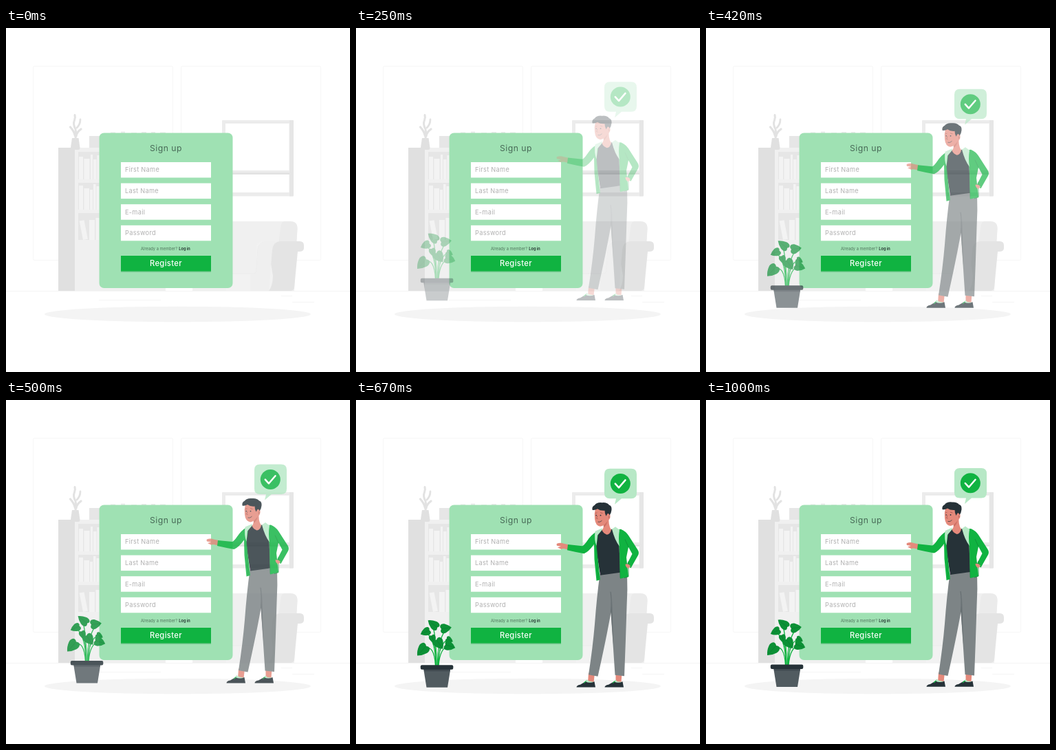
An HTML page that plays this animation: 500x500 px, repeating every 1.04 s.

```html
<!DOCTYPE html>
<html lang="en">
<head>
<meta charset="utf-8">
<title>Sign up</title>
<style>
  html, body { margin: 0; width: 100%; height: 100%; overflow: hidden; background: #fff; }
  svg { display: block; width: 100vw; height: 100vh; }
  text { font-family: Inter, "Open Sans", sans-serif; }
  .hint { font-size: 9.2px; letter-spacing: .3px; fill: #b0b0b0; }
</style>
</head>
<body>
<svg viewBox="0 0 500 500" xmlns="http://www.w3.org/2000/svg">
  <g id="room">
    <g fill="#fff" stroke="#f6f6f6">
      <rect x="39.5" y="55.5" width="203" height="282" rx="2"/>
      <rect x="254.5" y="55.5" width="203" height="282" rx="2"/>
    </g>
    <path d="M0 382.5H500" stroke="#efefef" stroke-width=".7"/>
    <path d="M135 395.5H225M416 398.5H448M400 389.5H416" stroke="#f1f1f1" stroke-width=".7"/>

    <!-- window -->
    <rect x="314" y="134" width="104" height="110.5" rx="1" fill="#ececec"/>
    <path d="M412 134H417Q418 134 418 135V243.5Q418 244.5 417 244.5H412Z" fill="#e6e6e6"/>
    <path d="M319 138H411.5V207H319ZM319 213H411.5V239H319Z" fill="#fff"/>
    <path d="M319 138H411.5" stroke="#e2e2e2"/>
    <path d="M317 211.5H412" stroke="#e0e0e0" stroke-width="2"/>

    <!-- shelf -->
    <path d="M100 174H232V382H100Z" fill="#f0f0f0"/>
    <path d="M76 174H100V382H76Z" fill="#e0e0e0"/>
    <path d="M105 180H232V220H105ZM105 225H232V264H105ZM105 269H232V308H105Z" fill="#e6e6e6"/>
    <g id="books" fill="#f3f3f3"></g>
    <path d="M121 157H150V174H121Z" fill="#e6e6e6"/>
    <path d="M152 151.5H159V156H152ZM167 150.5H173V156H167ZM182 152H190V156H182ZM197 151H204V156H197ZM211 151H217V156H211ZM224 151.5H232V156H224Z" fill="#ebebeb"/>
    <path d="M96 160H105.5L107.5 174Q107.5 177 105 177H96Q94 177 94 174Z" fill="#e0e0e0"/>
    <g fill="none" stroke="#e2e2e2" stroke-linecap="round">
      <path d="M101 161Q102 152 101 147Q97 140 99.500 134Q101 130 100 126.500" stroke-width="3"/>
      <path d="M100.500 157Q99 150 93.500 144M102 157Q103 151 109 147" stroke-width="3.200"/>
      <path d="M103 145Q108 140 108 133" stroke-width="2.800"/>
    </g>

    <!-- sofa -->
    <path d="M271 382V357H320V281H412Q424 281 423.500 292L419 382Z" fill="#f0f0f0"/>
    <path d="M404 281H413Q424 281 423.500 292L422 314H396L399 290Q399.500 282 404 281Z" fill="#ebebeb"/>
    <path d="M320 357H364V316Q366 310 376 310H395L385 382H320Z" fill="#f2f2f2"/>
    <path d="M329 357H362Q364 355 364 351L366 322Q367 311 378 311" fill="none" stroke="#e9e9e9" stroke-width=".8"/>
    <path d="M392 310H427Q433 310 433 316V320Q433 325 426 325H424L419 377Q418.500 382 413 382H382Q388 374 388 360L382 325Q383 310 392 310Z" fill="#e4e4e4"/>
    <path d="M378 310H398Q388 311 387 323L384 357Q383 370 382 382H355V357H362Q364 355 364 351L366 323Q367 310 378 310Z" fill="#efefef"/>
    <ellipse cx="249.500" cy="416" rx="193.500" ry="11.300" fill="#f4f4f4"/>
  </g>

  <g id="form">
    <rect x="135.500" y="152.500" width="194" height="225.500" rx="7" fill="#9fe1b3"/>
    <text x="209" y="178.500" font-size="12.200" letter-spacing=".5" fill="#486a57">Sign up</text>
    <g id="fields"></g>
    <text x="196" y="322.800" font-size="5.600" letter-spacing=".12" fill="#4d7059">Already a member?</text>
    <text x="251.300" y="322.800" font-size="5.600" font-weight="700" fill="#2b4038">Log in</text>
    <rect x="167" y="332" width="131" height="23" fill="#78c992"/>
    <rect x="167" y="331" width="131" height="22.500" fill="#10b341"/>
    <text x="209" y="345.600" font-size="11.200" letter-spacing=".35" font-weight="500" fill="#fff">Register</text>
  </g>

  <g class="drop" id="bubble">
    <path d="M369 99H400Q408 99 408 107V134.500Q408 142.500 400 142.500H386L376 151L378 142.500H369Q361 142.500 361 134.500V107Q361 99 369 99Z" fill="#b7e8c6"/>
    <circle cx="384.300" cy="120.800" r="14.500" fill="#10b341"/>
    <path d="M376.800 121L382 126.700L391.500 115.700" fill="none" stroke="#fff" stroke-width="2.500" stroke-linecap="round" stroke-linejoin="round"/>
  </g>

  <g class="drop" id="man">
    <!-- legs -->
    <g fill="#e4897b">
      <path d="M338 396H347L345.500 410H337Z"/>
      <path d="M377.500 396H386.500L385.500 410H377.500Z"/>
    </g>
    <g fill="#b7e8c6">
      <path d="M332 409L335 405.500L339 408L345 409V411H333Z"/>
      <path d="M374 409L377 406L380 408.500L386 409V411H375Z"/>
    </g>
    <g fill="#263238">
      <path d="M320.500 416.800Q320.500 414 326 413L333.500 408.500Q340 411.500 346.500 408.500L348 416.800Z"/>
      <path d="M361.500 416.800Q361.500 414 367 413L375 408.500Q381 411.500 387.500 408.500L389 416.800Z"/>
    </g>
    <path d="M331 411L334.500 408M373 411L376.500 408" stroke="#10b341" stroke-width="1.200"/>
    <path d="M354.500 252L394 249Q395 275 393.500 300Q392 350 390 400.500L376.500 399L370.500 308Q364 345 351.500 401L338 398.500Q344 360 347 325Q350 285 354.500 252Z" fill="#7d8486"/>
    <path d="M370.500 308Q372 290 370 278" fill="none" stroke="#5f686b" stroke-width=".9"/>
    <path d="M370.500 308L372 288L374.500 362Z" fill="#697174"/>

    <!-- torso -->
    <path d="M357 188L374 187L382 196L384 250L355 254L349 216L349.500 196Z" fill="#263238"/>
    <path d="M358 172L368 168Q366 180 371 188Q369 195 364.500 195Q359.500 193 357.500 188.500Q361 184 359.500 179Z" fill="#e4897b"/>
    <path d="M359.500 178.500Q364 179 366 174Q364 183 360 184Z" fill="#ce7266"/>

    <!-- jacket and arms -->
    <path d="M292 208Q297 206 302 208L309 209.500L308 217Q302 214.500 298 216L293 213.500L298 212L292 211Q291 209 292 208Z" fill="#e4897b"/>
    <path d="M308 209.300L329 211.500Q332 210 336 204Q342 195 349 191L352 194L349.500 212L351.500 230L355 260.500L349.500 262L346.500 231L346 209Q338 220 331.500 222.500Q320 220.500 307 217.500Z" fill="#10b341"/>
    <path d="M377 188L385 187Q392 190 396 196L409.500 217Q412 221 410 225L399.500 243.500L393 239.500L401.500 223L396 213L393 228L396 256L384 259L383 215Z" fill="#10b341"/>
    <path d="M396 213L391 202M396 234L396 256L390 258" fill="none" stroke="#0c8e35" stroke-width=".8"/>
    <path d="M391.500 238Q396 236.500 399 241L396 244Q392 243 391.500 238Z" fill="#e4897b"/>
    <path d="M347.500 190L358 185.500L357 189L351 196L349.500 211Q346 203 347.500 190Z" fill="#b7e8c6"/>
    <path d="M372 187L377 183.500L383 188Q381 200 383 212Q376 203 372 187Z" fill="#b7e8c6"/>
    <path d="M383 212L384 258M349.500 211L352 260" stroke="#0c8e35" stroke-width=".6"/>

    <!-- head -->
    <path d="M348 157Q346 164 347 172Q348 182 355 183Q361 182.500 365 175Q370 173 369.500 167L366 155L356 153Z" fill="#e4897b"/>
    <path d="M343.500 159Q342.500 154 347 152Q350 147.500 358 148.500Q365 148 368 152Q372 153 371.500 159Q371 164 368.500 167Q368 163.500 365.500 164.500L363.500 168Q361.500 164 361.500 160Q355 160.500 351 157.500Q347 160 343.500 159Z" fill="#263238"/>
    <path d="M367 168Q369 168.500 367.500 171M348.200 164L350.500 163.200M355 163L358.500 164M351 167.500L349.500 171.500L351.500 172" fill="none" stroke="#9b4f48" stroke-width=".7"/>
    <path d="M351.500 176.500Q355 177.500 357.500 174.500" fill="none" stroke="#263238" stroke-width=".7"/>
    <g fill="#263238"><circle cx="349.200" cy="167" r=".8"/><circle cx="355.500" cy="167" r=".9"/></g>
  </g>

  <g class="drop" id="plant">
    <g fill="none" stroke="#10b341" stroke-width="1.300">
      <path d="M117 386Q117 352 112 327M116 386Q116 350 103 338M118.500 386Q118 350 130 334"/>
      <path d="M115.500 386Q114 354 99 361M119 386Q121 366 123 357M120 386Q122 358 136 357M119 386Q120 352 135 347M116.500 386Q117 360 112 347"/>
    </g>
    <g id="leaves"></g>
    <path d="M98 389H137.500L133 417H102.500Z" fill="#515b60"/>
    <path d="M98.500 390H137L136.500 393.500H99Z" fill="#414b51"/>
    <rect x="93.800" y="384.500" width="47.500" height="6.500" rx="2" fill="#263238"/>
  </g>
</svg>
<script>
const LOOP = 1040, STEP = 1000 / 24, DROP = 30;
const $ = id => document.getElementById(id);

$("fields").innerHTML = ["First Name", "Last Name", "E-mail", "Password"].map((label, i) => {
  const y = 195 + i * 30.6;
  return `<rect x="167" y="${y}" width="131" height="22.500" fill="#fff"/>` +
    `<text class="hint" x="173" y="${y + 14.3}">${label}</text>`;
}).join("");

const book = (x, base, w, h, tilt = 0) =>
  `<rect x="${x}" y="${base - h}" width="${w}" height="${h}" transform="rotate(${tilt} ${x} ${base})"/>`;
$("books").innerHTML = [
  book(106, 220, 6, 33), book(113.500, 220, 8, 30), book(123, 220, 3, 36), book(127, 220, 4.500, 29), book(132.500, 220, 4, 35),
  book(106, 264, 6, 35), book(113.500, 264, 7.500, 31), book(122, 264, 4, 29), book(127, 264, 3.500, 37), book(131.500, 264, 5, 34),
  book(112, 308, 7, 28, -11), book(121, 308, 8, 29), book(130.500, 308, 6, 32)
].join("");

// Heart-shaped leaf: rounded base at (x, y), tip along the angle.
function leaf(x, y, len, wide, angle) {
  const h = wide / 2;
  return `<g transform="translate(${x} ${y}) rotate(${angle})">` +
    `<path d="M0 0C${-len * .25} ${-h * .8} ${len * .1} ${-h * 1.3} ${len * .4} ${-h}Q${len * .75} ${-h * .7} ${len} 0` +
    `Q${len * .75} ${h * .7} ${len * .4} ${h}C${len * .1} ${h * 1.3} ${-len * .25} ${h * .8} 0 0Z" fill="#0c9036"/>` +
    `<path d="M0 0H${len * .85}" stroke="#0a7a2e" stroke-width=".6"/></g>`;
}
$("leaves").innerHTML = [
  leaf(118, 330, 17, 12, 218), leaf(106.500, 334, 14, 11, 155), leaf(124, 332, 15, 13, -8),
  leaf(102, 357, 19, 15, 133), leaf(132, 346, 10, 8, 28), leaf(110, 342, 12, 9, 72),
  leaf(117, 348, 16, 14, 55), leaf(130, 355, 15, 13, 18)
].join("");

const cubic = (u, a, b) => 3 * u * (1 - u) * ((1 - u) * a + u * b) + u ** 3;

function ease(x) {
  let lo = 0, hi = 1;
  for (let i = 0; i < 30; i++) {
    const mid = (lo + hi) / 2;
    if (cubic(mid, .36, .5) < x) lo = mid; else hi = mid;
  }
  return cubic(lo, -.01, 1.38);
}

const movers = document.querySelectorAll(".drop");

function draw(ms) {
  const n = Math.floor((ms + 5) / STEP);
  const k = n < 2 ? 0 : n > 22 ? 1 : ease((n + 1) / 24);
  for (const el of movers) {
    el.setAttribute("transform", `translate(0 ${(k - 1) * DROP})`);
    el.setAttribute("opacity", Math.min(1, k));
  }
}

const start = performance.now();
function tick() {
  draw((performance.now() - start) % LOOP);
  requestAnimationFrame(tick);
}
draw(0);
requestAnimationFrame(tick);
</script>
</body>
</html>
```
